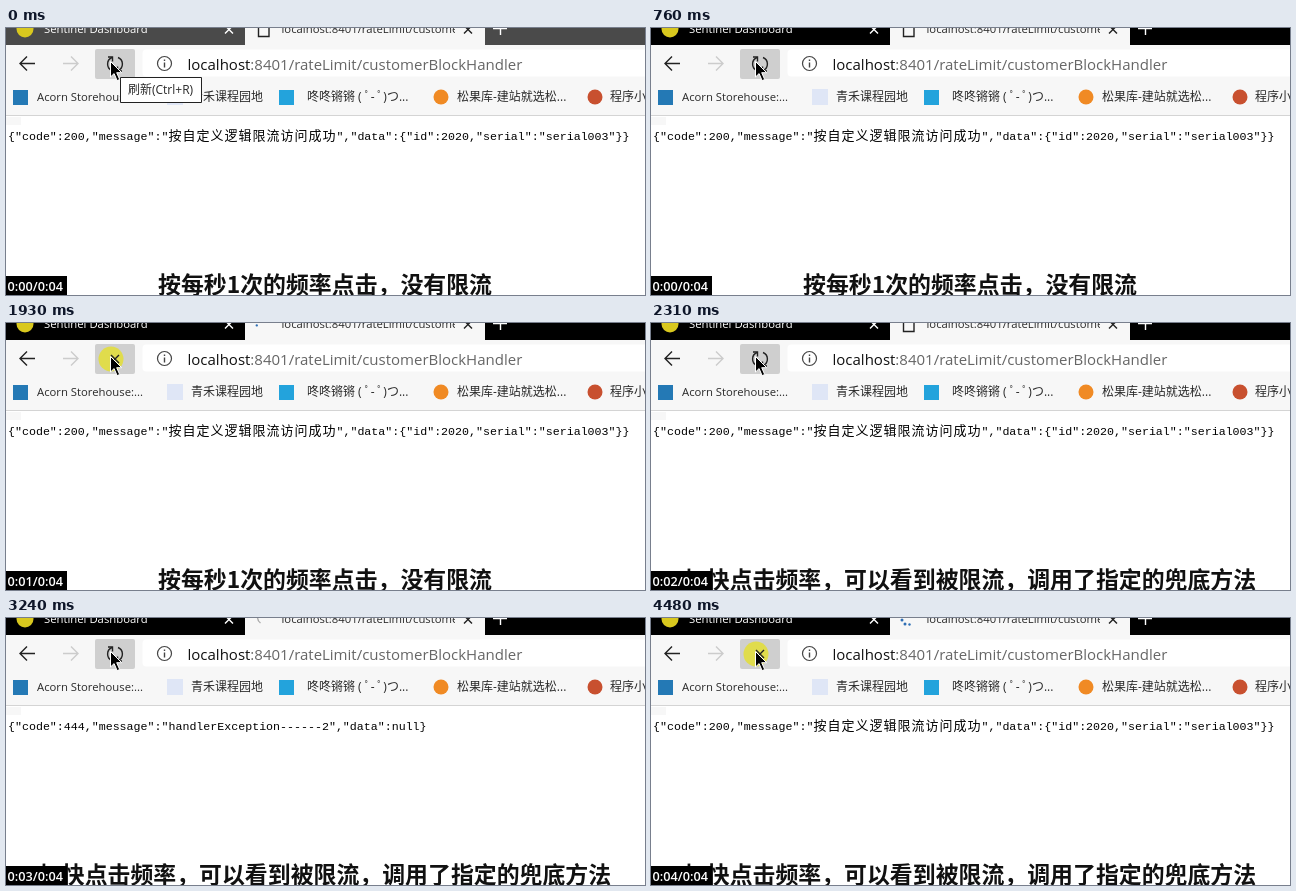
An HTML page that plays this animation: 639 px wide and 267 px high, repeating every 4.56 s.

```html
<!DOCTYPE html>
<html lang="zh">
<head>
<meta charset="utf-8">
<style>
  html, body { margin: 0; width: 100%; height: 100%; overflow: hidden; background: #fff; }
  svg { display: block; width: 639px; height: 267px; }
  text { font: 11.3px "Open Sans", "Noto Sans CJK SC", sans-serif; fill: #2a2a2a; }
  .cjk text, text.cjk { font-size: 12px; }
  .line { fill: none; stroke: #222; stroke-width: 1.4; }
  #url { font-size: 15px; fill: #666; }
  #url tspan { fill: #111; }
  .json { font: 11.64px "Liberation Mono", monospace; fill: #000; }
  .json tspan { font: 13px "Noto Sans CJK SC", sans-serif; letter-spacing: 1px; }
  #caption { font: 700 22.9px "Noto Sans CJK SC", sans-serif; fill: #111; text-anchor: middle; }
  #clock { font-size: 12.7px; font-weight: 600; fill: #fff; }
</style>
</head>
<body>
<svg viewBox="0 0 639 267">
  <defs>
    <clipPath id="titleClip"><path d="M270 0h179v13H270z"/></clipPath>
    <path id="close" d="M-4 -4l8 8M4 -4l-8 8"/>
  </defs>

  <!-- tab strip -->
  <rect id="strip" width="639" height="17"/>
  <circle cx="19" cy="1" r="8.5" fill="#d9c81e"/>
  <text x="38" y="5" style="fill:#fff">Sentinel Dashboard</text>
  <use href="#close" x="223" y="1.500" class="line" style="stroke:#fff"/>
  <path d="M239 0h240v17H239z" fill="#f7f7f7"/>
  <path id="page" class="line" d="M252.500 -4h10.500v12.500h-10.500z"/>
  <path id="arc" class="line" d="M251.500 -1q0 4 3 6" style="stroke:#aaa"/>
  <g id="dots" fill="#2f6fb5">
    <circle cx="251" cy="2" r="1.500"/><circle cx="254" cy="6" r="1.500"/>
    <circle cx="258.500" cy="6.500" r="1.200"/>
  </g>
  <text x="275.500" y="5" clip-path="url(#titleClip)">localhost:8401/rateLimit/customer</text>
  <use href="#close" x="462" y="1.500" class="line"/>
  <path class="line" d="M487 .5h14M494.500 0v7" style="stroke:#fff"/>

  <!-- toolbar -->
  <path d="M0 17h639v70H0z" fill="#f7f7f7"/>
  <rect x="136.500" y="21.500" width="520" height="27" rx="4" fill="#fff"/>
  <path class="line" d="M29 35.500H14M21 28.500l-7 7 7 7"/>
  <path class="line" d="M57 35.500h15M65 28.500l7 7-7 7" style="stroke:#ccc"/>
  <rect x="89" y="21" width="40" height="30" rx="2" fill="#cfcfcf"/>
  <circle id="press" cx="105" cy="36" r="12.500" fill="#e0dc4c"/>
  <g id="reload" class="line">
    <path d="M106 42.500A7 7 0 0 1 106 29.500M112 29.500A7 7 0 0 1 112 42.500"/>
    <path d="M102 29h4.500v4.500M116 43h-4.500v-4.500"/>
  </g>
  <use id="stop" href="#close" x="109" y="36" class="line"/>
  <g class="line" style="stroke:#444">
    <circle cx="158.500" cy="35.500" r="7" stroke-width="1.2"/>
    <path d="M158.500 34.500v5M158.500 31.500v1.500"/>
  </g>
  <text id="url" x="181.500" y="42"><tspan>localhost</tspan>:8401/rateLimit/customerBlockHandler</text>

  <!-- bookmarks -->
  <path d="M7 62h15v15H7z" fill="#2479b5"/>
  <text x="31" y="73">Acorn Storehouse:...</text>
  <g class="cjk">
    <path d="M161 61h16v16h-16z" fill="#dfe6f6"/>
    <text x="185" y="73">青禾课程园地</text>
    <path d="M273 62h15v15h-15z" fill="#23a3dc"/>
    <text x="301" y="73">咚咚锵锵 ( ﾟ- ﾟ)つ...</text>
    <circle cx="435" cy="69" r="7.500" fill="#f08a24"/>
    <text x="451" y="73">松果库-建站就选松...</text>
    <circle cx="589" cy="69" r="7.500" fill="#c8502f"/>
    <text x="604" y="73">程序小屋</text>
  </g>

  <!-- page -->
  <path d="M0 87h639v1H0z" fill="#d4d4d4"/>
  <path d="M0 88h639v179H0z" fill="#fff"/>
  <path d="M0 89h15v8H0z" fill="#f7f7f7"/>
  <text id="ok" class="json" x="2" y="112">{"code":200,"message":"<tspan>按自定义逻辑限流访问成功</tspan>","data":{"id":2020,"serial":"serial003"}}</text>
  <text id="blocked" class="json" x="2" y="112">{"code":444,"message":"handlerException------2","data":null}</text>
  <text id="caption" x="319" y="265"></text>
  <path d="M0 248h61v19H0z"/>
  <text id="clock" x="1.500" y="263"></text>

  <!-- pointer -->
  <g id="tooltip">
    <path class="line" d="M114.500 49.500h81v25h-81z" style="fill:#fff;stroke-width:1"/>
    <text class="cjk" x="122" y="66">刷新(Ctrl+R)</text>
  </g>
  <path d="M104.500 33.500v15.500l3.600-3.400 3 7 2.600-1.100-3-6.800h5z" stroke="#fff"/>
</svg>
<script>
const LOOP = 4560;
// [start in ms, browser state, response shown]
const steps = [
  [0, 'idle', 'ok'], [380, 'press', 'ok'], [460, 'load', 'ok'], [530, 'load', 'ok'],
  [610, 'arc', ''], [690, 'arc', 'ok'], [760, 'idle', 'ok'],
  [1220, 'press', 'ok'], [1390, 'load', 'ok'], [1460, 'idle', 'ok'],
  [1850, 'press', 'ok'], [1930, 'load', 'ok'], [2000, 'arc', 'blocked'],
  [2080, 'press', 'blocked'], [2160, 'load', 'blocked'], [2230, 'arc', 'ok'], [2310, 'idle', 'ok'],
  [2390, 'press', 'ok'], [2460, 'load', 'ok'], [2540, 'arc', 'blocked'], [2620, 'press', 'blocked'],
  [2700, 'load', 'blocked'], [2780, 'arc', 'ok'], [2860, 'idle', 'ok'],
  [2940, 'press', 'ok'], [3010, 'load', 'ok'], [3090, 'load', 'blocked'], [3240, 'arc', 'blocked'],
  [3330, 'idle', 'blocked'], [3480, 'press', 'blocked'], [3560, 'load', 'blocked'],
  [3640, 'arc', 'ok'], [3720, 'press', 'ok'], [3800, 'load', 'ok'], [3880, 'arc', 'blocked'],
  [3950, 'idle', 'blocked'], [4030, 'press', 'blocked'], [4100, 'load', 'blocked'],
  [4180, 'arc', 'ok'], [4260, 'idle', 'ok'], [4410, 'press', 'ok'], [4480, 'load', 'ok']
];
const seconds = [990, 2000, 3010, 3950];
const captions = ['按每秒1次的频率点击，没有限流', '加快点击频率，可以看到被限流，调用了指定的兜底方法'];

const el = id => document.getElementById(id);
const show = (id, on) => el(id).style.display = on ? '' : 'none';

function draw(t) {
  const [, state, response] = steps.findLast(s => s[0] <= t);
  const loading = state === 'load';
  show('page', state === 'idle' || state === 'press');
  show('arc', state === 'arc');
  show('dots', loading);
  show('reload', !loading);
  show('stop', loading);
  show('press', loading || state === 'press');
  show('tooltip', t < 380 || (t >= 920 && t < 1220));
  show('ok', response === 'ok');
  show('blocked', response === 'blocked');
  el('strip').setAttribute('fill', t < 380 ? '#4a4a4a' : '#000');
  el('dots').setAttribute('transform', `rotate(${(t - 4480) / 4} 257 0)`);
  el('caption').textContent = captions[+(t >= 2000)];
  el('clock').textContent = `0:0${seconds.filter(s => s <= t).length}/0:04`;
}

let start;
function tick(now) {
  start ??= now;
  draw((now - start) % LOOP);
  requestAnimationFrame(tick);
}
draw(0);
requestAnimationFrame(tick);
</script>
</body>
</html>
```
